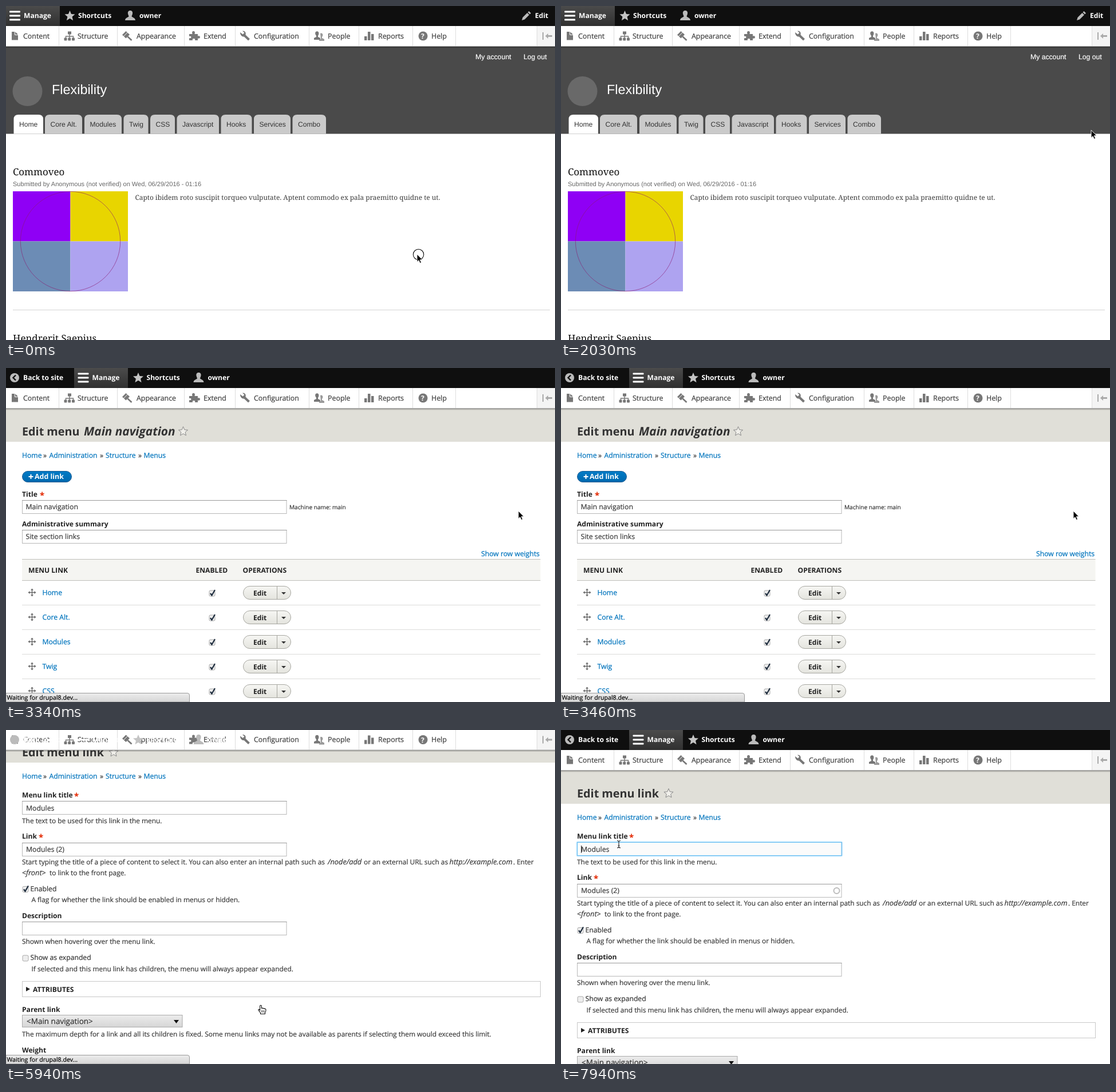
Animation of 959x584 px, one loop 8 s. Source, as an HTML page:

```html
<!DOCTYPE html>
<html lang="en">
<head>
<meta charset="utf-8">
<title>Menu link editing</title>
<style>
html, body { margin: 0; width: 100%; height: 100%; overflow: hidden; background: #fff; }
svg { display: block; width: 100%; height: 100%; }
text { font: 12.2px "Open Sans", "Noto Sans", sans-serif; fill: #333; stroke: #333; stroke-width: .2px; white-space: pre; text-rendering: geometricPrecision; }
.bar, .bold, .add, .req, .h1, .tab, .site, .meta, .title { stroke: none; }
.bar { font-weight: 700; font-size: 12.1px; fill: #fff; }
.tray { font-size: 12.4px; fill: #444; stroke: #444; stroke-width: .25px; }
.bold { font-weight: 700; font-size: 12.1px; fill: #222; }
.add { font-weight: 700; font-size: 12.4px; fill: #fff; }
.req { font-weight: 700; font-size: 15px; fill: #e32700; }
.h1 { font-weight: 700; font-size: 19.8px; fill: #333; }
.link { fill: #0074bd; stroke: #0074bd; stroke-width: .25px; }
.field { font-size: 12.3px; fill: #3c3c3c; }
.help { font-size: 11.9px; fill: #3c3c3c; }
.it { font-style: italic; }
.help.it { font-size: 12.8px; }
.h1.it { font-size: 20.8px; }
.small { font-size: 10.1px; }
.status { font-size: 10.6px; fill: #000; stroke: #000; }
.select { font-size: 13.5px; }
.sans, .tab, .site, .meta { font-family: "Liberation Sans", Arial, sans-serif; }
.sans { font-size: 12.2px; fill: #fff; stroke: #fff; }
.tab { font-size: 12.1px; }
.site { font-size: 23.4px; fill: #fff; }
.meta { font-size: 11.04px; fill: #666; }
.title, .prose { font-family: "Noto Serif", Georgia, serif; }
.title { font-size: 16.9px; fill: #111; }
.prose { font-size: 11.86px; fill: #3b3b3b; stroke: none; }
</style>
</head>
<body>
<svg id="stage" viewBox="0 0 959 584" preserveAspectRatio="none"></svg>
<script>
const esc = s => s.replace(/&/g, '&amp;').replace(/</g, '&lt;');
const text = (x, y, s, cls = '') => `<text x="${x}" y="${y}" class="${cls}">${esc(s)}</text>`;
const rect = (x, y, w, h, fill, more = '') =>
  `<rect x="${x}" y="${y}" width="${w}" height="${h}" fill="${fill}" ${more}/>`;
const path = (d, fill, more = '') => `<path d="${d}" fill="${fill}" ${more}/>`;
const line = (d, color, w = 1) => path(d, 'none', `stroke="${color}" stroke-width="${w}"`);
const disc = (x, y, r, fill, more = '') => `<circle cx="${x}" cy="${y}" r="${r}" fill="${fill}" ${more}/>`;
const group = (id, body) => `<g id="${id}">${body}</g>`;

function star(x, y, r, fill, more) {
  let d = '';
  for (let i = 0; i < 10; i++) {
    const a = -Math.PI / 2 + i * Math.PI / 5, q = i % 2 ? r * .45 : r;
    d += (i ? 'L' : 'M') + (x + q * Math.cos(a)).toFixed(2) + ' ' + (y + q * Math.sin(a)).toFixed(2);
  }
  return path(d + 'Z', fill, more);
}

const fade = (id, from, to) =>
  `<linearGradient id="${id}" x2="0" y2="1"><stop offset="0" stop-color="${from}"/><stop offset="1" stop-color="${to}"/></linearGradient>`;
const defs = '<defs>' + fade('active', '#4b4b4b', '#303030') + fade('shade', 'rgba(0,0,0,.45)', 'rgba(0,0,0,0)') +
  fade('blue', '#007bc6', '#0068ae') + fade('pill', '#f6f6f3', '#e4e4de') + fade('grey', '#ececec', '#d6d6d6') + '</defs>';

// Black bar
function barItems() {
  const burger = [8.5, 15.5, 22.5].map(y => rect(6, y, 19, 3, '#fff', 'rx="1"')).join('');
  const user = path('M217 8c3.500 0 4.500 2.500 4 5.500-.3 2-1.200 3.200-1.500 4.500.5 2 6 2 6.500 7H208c.5-5 6-5 6.500-7-.3-1.300-1.200-2.500-1.500-4.500C212.500 10.500 213.500 8 217 8Z', '#bbb');
  return burger + text(31, 21, 'Manage', 'bar') + star(111.5, 17.5, 9.5, '#c4c4c4') +
    text(126, 21, 'Shortcuts', 'bar') + user + text(233, 21, 'owner', 'bar');
}
const back = disc(15, 17, 8, '#bbb') + group('chevron', line('M17 12.500L12.500 17L17 21.500', '#0f0f0f', 2.4)) +
  text(30, 21, 'Back to site', 'bar');
const pencil = path('M901 25l1.500-5 8-8 3.500 3.500-8 8ZM911.500 11l2-2 3.500 3.500-2 2Z', '#bbb') +
  text(924, 21, 'Edit', 'bar');
const bar = group('bar',
  group('barBg', rect(0, 0, 959, 35, '#0f0f0f') + rect(0, 0, 94, 35, 'url(#active)', 'id="tabBg"')) +
  group('barItems', barItems()) + group('back', back) + group('pencil', pencil));

// White tray
const grey = '#777';
const icons = [
  path('M10 45h6l5 5v9.500H10Z', grey) + line('M15.500 45v5.500H21', '#fff', 1),
  rect(108, 44.5, 6, 5, grey) + line('M111 49v7M104.500 56v-3h13v3', grey, 1.4) +
    [101.5, 108.2, 115].map(x => rect(x, 55.5, 5, 5, grey, 'rx="1"')).join(''),
  path('M203 50.500l6.500-6.500 6.500 6-6.500 6.500Z', grey) + line('M205.500 53l7-7', '#fff', 1) +
    line('M212.500 53.500l7 6.500', grey, 2.6),
  path('M320 49h5.500q-1.500-5 2-5t2 5H335v3.500q4-1 4 2t-4 2V60h-5q1-3-2-3t-2 3H320v-4q3.500 1 3.500-1.500t-3.500-1.500Z', grey),
  line('M415 50l9.500 9', grey, 4) + path('M409 46l4.500 3.500 3-2.500-3.500-3.500c5-.5 7 4 5 8s-9 2-9-5.500Z', grey),
  path('M541 45c5-3 7 3 4 7v2l4 2v3H538v-3l4-2v-2c-2-2-2.500-5-1-7Z', grey) +
    path('M549 48c4-2 6 3 3 6v2l4 2v3h-9v-2l3-1Z', '#999'),
  [[626, 53], [632, 45], [638, 49]].map(([x, y]) => rect(x, y, 4.5, 60 - y, grey)).join(''),
  disc(728.5, 52.5, 8, grey) + '<text x="725" y="57" class="bold" style="fill:#fff">?</text>'
];
const trayText = [[30, 'Content'], [125, 'Structure'], [228, 'Appearance'], [345, 'Extend'],
  [433, 'Configuration'], [562, 'People'], [650, 'Reports'], [743, 'Help']];
const dividers = [92.5, 194.5, 311.5, 400.5, 529.5, 616.5, 710.5, 785.5, 927.5];
const tray = group('tray',
  rect(0, 70, 959, 4, 'url(#shade)') + rect(0, 35, 959, 35.5, '#fff') + rect(928, 35, 31, 35.5, '#f4f4f4') +
  line(dividers.map(x => `M${x} 35V70`).join(''), '#ddd') + line('M0 70.500H959', '#aaa') +
  icons.join('') + trayText.map(([x, s]) => text(x, 56.5, s, 'tray')).join('') +
  rect(937, 46, 2, 13, '#aaa') + path('M942 52.500l5-4.500v3h7v3h-7v3Z', '#aaa'));

// Front page
const tabs = [[13.5, 51.5, 'Home'], [68, 65, 'Core Alt.'], [137, 65, 'Modules'], [205.5, 43, 'Twig'],
  [252, 43, 'CSS'], [298.5, 73.5, 'Javascript'], [375.5, 54, 'Hooks'], [433, 64, 'Services'], [500.5, 58.5, 'Combo']];
const front = group('front',
  rect(0, 70, 959, 153.5, '#4a4a4a') + text(820, 93, 'My account', 'sans') + text(904, 93, 'Log out', 'sans') +
  disc(37.5, 149, 26, '#696969') + text(80, 153.5, 'Flexibility', 'site') +
  tabs.map(([x, w, s], i) =>
    path(`M${x} 223.500V198q0-8 8-8h${w - 16}q8 0 8 8v25.500Z`, i ? '#cacaca' : '#fff') +
    text(x + 9.5, 211, s, 'tab')).join('') +
  text(12, 295.5, 'Commoveo', 'title') +
  text(12, 315, 'Submitted by Anonymous (not verified) on Wed, 06/29/2016 - 01:16', 'meta') +
  rect(12, 324, 100.5, 87.5, '#8f00f5') + rect(112.5, 324, 100.5, 87.5, '#e8d500') +
  rect(12, 411.5, 100.5, 87.5, '#6c8cb5') + rect(112.5, 411.5, 100.5, 87.5, '#aea3f0') +
  disc(112.5, 411.5, 87.2, 'none', 'stroke="#8a1a70" stroke-opacity=".6"') +
  text(225.5, 339, 'Capto ibidem roto suscipit torqueo vulputate. Aptent commodo ex pala praemitto quidne te ut.', 'prose') +
  line('M12 531.500H950', '#d3d3d3') + text(12, 587, 'Hendrerit Saepius', 'title'));

// Shared form parts
const input = y => rect(28.5, y + .5, 461.5, 23, '#fff', 'stroke="#b8b8b8"') + line(`M28 ${y + .5}H490.500`, '#999');
const check = (x, y, on) => rect(x - 5, y - 5, 10, 10, '#eee', 'stroke="#aaa" rx="2"') +
  (on ? line(`M${x - 3} ${y}l2.500 3.500L${x + 5} ${y - 6}`, '#1c2b3c', 2.2) : '');
const required = (x, y) => text(x, y + 2.5, '*', 'req');
const crumbs = [[28, 'Home'], [75.5, 'Administration'], [174, 'Structure'], [240.5, 'Menus']]
  .map(([x, s]) => text(x, 157, s, 'link')).join('') + [65, 164, 231].map(x => text(x, 157, '»')).join('');
const head = (starX, title) => rect(0, 70, 959, 59, '#e0dfd8') + title +
  star(starX, 111, 8.5, '#f0efea', 'stroke="#888"') + crumbs;

// Menu page
function row(s, i) {
  const y = 372 + 43 * i, c = y + 21;
  return line(`M28 ${y + 42.5}H933.500`, '#dcdcda') +
    line(`M40 ${c - .5}h11M45.500 ${c - 6}v11`, '#666', 1.3) +
    path(`M45.500 ${c - 7.5}l2.500 3h-5ZM45.500 ${c + 6.5}l2.500-3h-5ZM38.500 ${c - .5}l3-2.500v5ZM52.500 ${c - .5}l-3-2.500v5Z`, '#666') +
    text(63.5, c + 4, s, 'link') + check(360, c + 1, true) +
    rect(414.5, c - 11.5, 83, 23, 'url(#pill)', 'rx="11.500" stroke="#a6a6a0"') +
    line(`M473.500 ${c - 11}v23`, '#a6a6a0') + text(432, c + 4.5, 'Edit', 'bold') +
    path(`M481 ${c - 1}h8l-4 4Z`, '#333');
}
const menu = group('menu',
  head(309.5, text(28, 118, 'Edit menu', 'h1') + text(136, 118, 'Main navigation', 'h1 it')) +
  rect(28.5, 180.5, 86, 19, 'url(#blue)', 'rx="9.500" stroke="#1e5c90"') +
  line('M39.500 190h8M43.500 186v8', '#fff', 2) + text(50, 194, 'Add link', 'add') +
  text(28, 225, 'Title', 'bold') + required(59, 225) + input(231) + text(34.5, 247, 'Main navigation', 'field') +
  text(495, 246.5, 'Machine name: main', 'small') +
  text(28, 277, 'Administrative summary', 'bold') + input(283) + text(34.5, 299, 'Site section links', 'field') +
  text(830, 329, 'Show row weights', 'link') +
  rect(28, 334, 905.5, 38, '#f5f5f2') + line('M28 334.500H933.500M28 371.500H933.500', '#bfbfba') +
  text(39, 357.5, 'MENU LINK', 'bold') + text(331.5, 357.5, 'ENABLED', 'bold') + text(413.5, 357.5, 'OPERATIONS', 'bold') +
  rect(28, 372, 905.5, 42, '#f3faff', 'id="hover"') +
  ['Home', 'Core Alt.', 'Modules', 'Twig', 'CSS'].map(row).join(''));

// Link form
const form = group('form',
  head(188, text(28, 118, 'Edit menu link', 'h1')) +
  text(28, 190, 'Menu link title', 'bold') + required(119, 190) + input(196) +
  group('focus', rect(27.5, 195.5, 463.5, 25, 'none', 'stroke="#40b6ff" stroke-opacity=".3" stroke-width="2" rx="2"') +
    rect(28.5, 196.5, 461.5, 23, '#fbfbfb', 'stroke="#5cb8f0"') + line('M35.500 202V215', '#222')) +
  text(35, 212.5, 'Modules', 'field') + text(28, 235, 'The text to be used for this link in the menu.', 'help') +
  text(28, 262, 'Link', 'bold') + required(57, 262) + input(269) + text(35, 284.5, 'Modules (2)', 'field') +
  group('throbber', disc(481.5, 281, 5, 'none', 'stroke="#bbb" stroke-width="2"')) +
  text(28, 307, 'Start typing the title of a piece of content to select it. You can also enter an internal path such as', 'help') +
  text(562, 307, '/node/add', 'help it') + text(625, 307, 'or an external URL such as', 'help') +
  text(774.5, 307, 'http://example.com', 'help it') + text(886, 307, '. Enter', 'help') +
  text(28, 325.5, '<front>', 'help it') + text(76, 325.5, 'to link to the front page.', 'help') +
  check(34, 350.5, true) + text(42.5, 354, 'Enabled') +
  text(44.5, 373, 'A flag for whether the link should be enabled in menus or hidden.', 'help') +
  text(28, 401, 'Description', 'bold') + input(407) + text(28, 446, 'Shown when hovering over the menu link.', 'help') +
  check(34, 471, false) + text(42.5, 474, 'Show as expanded') +
  text(44.5, 493.5, 'If selected and this menu link has children, the menu will always appear expanded.', 'help') +
  rect(28.5, 511.5, 905, 27, '#fff', 'stroke="#c8c8c8"') + path('M35 521l7 4-7 4Z', '#222') +
  text(47, 529.5, 'ATTRIBUTES', 'bold') +
  text(28, 565, 'Parent link', 'bold') + rect(28.5, 570.5, 279.5, 21, 'url(#grey)', 'stroke="#aaa"') +
  text(36, 586, '<Main navigation>', 'select') + path('M293 579h9l-4.500 6Z', '#111') +
  text(28, 608, 'The maximum depth for a link and all its children is fixed. Some menu links may not be available as parents if selecting them would exceed this limit.', 'help') +
  text(28, 636, 'Weight', 'bold'));

const status = group('status',
  path('M0 568.500H317q3.500 0 3.500 3.500V584H0Z', 'url(#grey)', 'stroke="#999"') +
  '<text id="note" x="1.500" y="579.500" class="status"></text>');

const cursor = group('cursor',
  disc(2.5, .5, 9.2, 'none', 'id="ring" stroke="#111" stroke-width="1.100"') +
  group('arrow', path('M0 0V13.500L3 10.700 5.200 15.600 7.500 14.600 5.300 9.800H9.500Z', '#000', 'stroke="#fff" stroke-width=".9"')) +
  group('hand', path('M-1.400 1.200Q0-.8 1.400 1.200V5.500Q3 4.500 4 6Q6 5 6.500 6.500Q9 6 9 8.500Q9 11 7.500 13V15.500H-.5V13.500L-4 9Q-4.500 7-2.800 7.500L-1.400 9Z', '#fff', 'stroke="#111" stroke-width="1.100"') +
    line('M1.600 9v4M3.800 9v4M6 9v4', '#111', .8)) +
  group('beam', line('M-3-5.500Q0-5.500 0-3.500Q0-5.500 3-5.500M0-4V6M-3 7Q0 7 0 5Q0 7 3 7M-1.500 3h3', '#222', 1.1)));

const stage = document.getElementById('stage');
stage.innerHTML = defs + rect(0, 0, 959, 584, '#fff') + front + menu + form + tray + bar + status + cursor;

const LOOP = 8000;
const $ = id => document.getElementById(id);
const show = (id, on) => $(id).setAttribute('display', on ? 'inline' : 'none');
const move = (id, x, y) => $(id).setAttribute('transform', `translate(${x} ${y})`);
const between = (t, a, b) => t >= a && t < b;

// Pointer moves: start, last step, steps, end x, end y
const moves = [
  [500, 960, 5, 952, 223], [1080, 1200, 2, 943, 199], [1910, 2390, 5, 895, 250],
  [3570, 3920, 4, 513, 478], [4150, 4630, 5, 445, 481], [7010, 7710, 7, 101, 199]
];
function pointer(t) {
  let x = 718, y = 434;
  for (const [a, b, n, tx, ty] of moves) {
    if (t < a) break;
    const k = Math.min(n, 1 + Math.floor((t - a + 8) / ((b - a) / (n - 1))));
    const s = k / n, f = s * s * (3 - 2 * s);
    x += (tx - x) * f;
    y += (ty - y) * f;
  }
  return [x, y];
}

function statusText(t) {
  if (between(t, 2390, 2860)) return 'drupal8.dev/owner/structure/menu/manage/main?destin...';
  if (between(t, 4390, 5580)) return 'drupal8.dev/owner/structure/menu/item/2/edit?destination=...';
  if (between(t, 2860, 3690) || between(t, 5580, 6300)) return 'Waiting for drupal8.dev...';
  return '';
}

function draw(t) {
  const page = t < 3340 ? 'front' : t < 5940 ? 'menu' : 'form';
  const loading = between(t, 5940, 6060);
  const isFront = page === 'front';
  for (const id of ['front', 'menu', 'form']) show(id, id === page);
  show('barBg', !loading);
  show('chevron', !loading);
  show('back', !isFront);
  show('pencil', isFront);
  move('barItems', isFront ? 0 : 119.5, 0);
  move('tabBg', isFront ? 0 : 119, 0);
  move('tray', 0, loading ? -35.5 : 0);
  move('form', 0, loading ? -72 : 0);
  show('throbber', !loading);
  show('focus', t >= 7820);

  const [x, y] = pointer(t), hovered = Math.floor((y - 372) / 43);
  show('hover', page === 'menu' && hovered >= 0);
  move('hover', 0, hovered * 43);
  move('cursor', x, y);
  const hand = between(t, 4390, 7010), beam = t >= 7700;
  show('hand', hand);
  show('beam', beam);
  show('arrow', !hand && !beam);
  show('ring', [[0, 110], [1560, 1680], [2620, 2740], [5340, 5460]].some(([a, b]) => between(t, a, b)));

  const note = statusText(t);
  show('status', note);
  $('note').textContent = note;
}

const start = performance.now();
function tick() {
  draw((performance.now() - start) % LOOP);
  requestAnimationFrame(tick);
}
tick();
</script>
</body>
</html>
```
